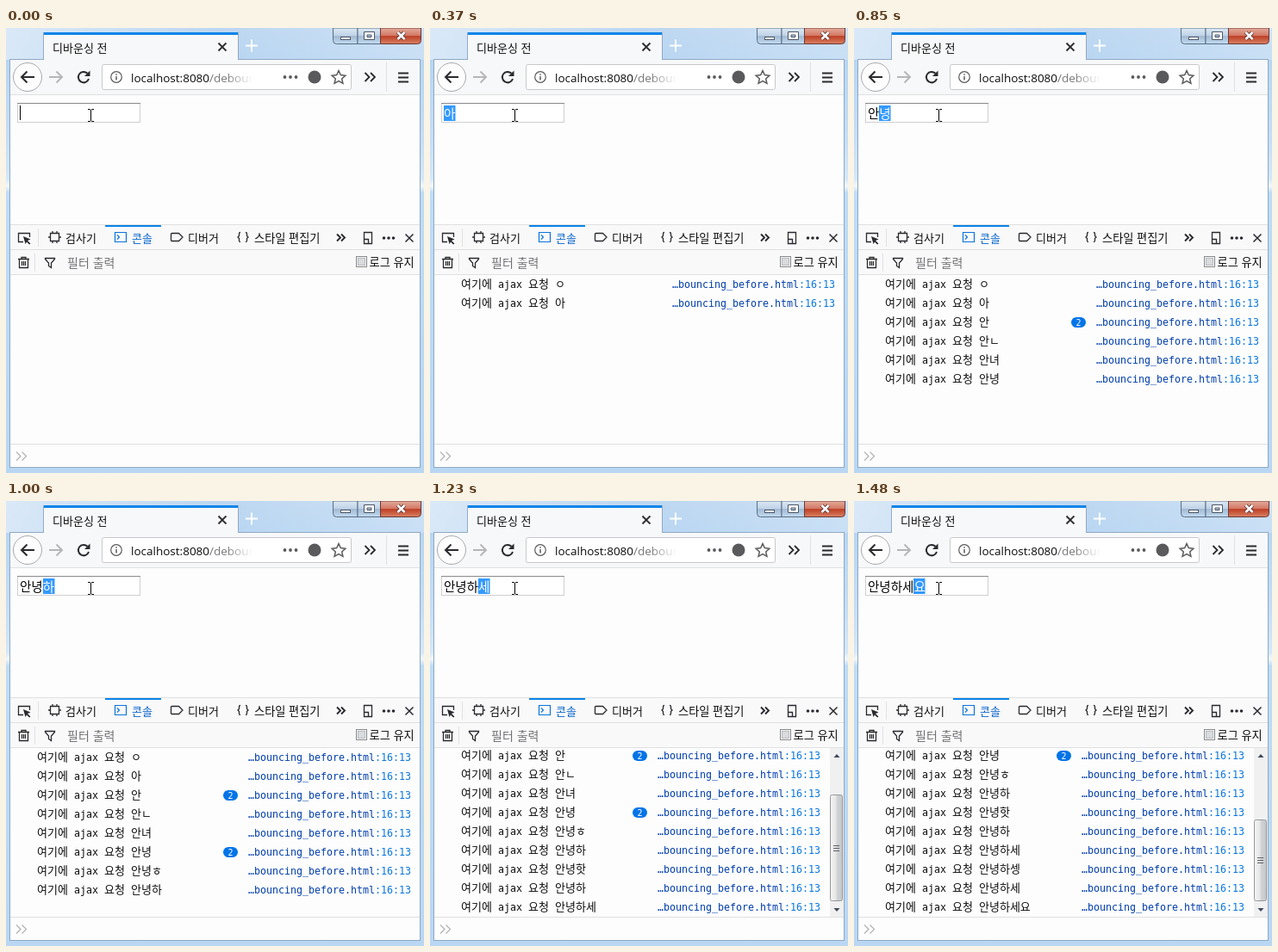
Write an HTML page that moves like this. It is 485 px wide and 517 px high and loops after 1.93 s.

```html
<!DOCTYPE html>
<html lang="ko">
<head>
<meta charset="utf-8">
<title>디바운싱 전</title>
<style>
html, body { margin: 0; width: 100%; height: 100%; overflow: hidden; }
svg { display: block; width: 485px; height: 517px; }
text { font: 13px "Noto Sans CJK KR", "Noto Sans CJK JP", "Noto Sans CJK", sans-serif; fill: #0c0c0d; white-space: pre; }
.url { font: 13.5px "Open Sans", "Noto Sans", sans-serif; }
.mono { font: 11.63px "DejaVu Sans Mono", monospace; }
.field { font-size: 14.5px; fill: #000; }
.line { fill: none; stroke: #2a2a2e; stroke-width: 1.3; }
.rule { fill: none; stroke: #e0e0e2; }
</style>
</head>
<body>
<svg viewBox="0 0 485 517" xmlns="http://www.w3.org/2000/svg">
  <defs>
    <linearGradient id="glass" x1="0" y1="0" x2="0" y2="1">
      <stop offset="0" stop-color="#bdd7f1"/><stop offset=".07" stop-color="#b7d5f2"/>
      <stop offset=".25" stop-color="#c6def5"/><stop offset=".34" stop-color="#d6e8f8"/>
      <stop offset=".355" stop-color="#f2f8fd"/><stop offset=".37" stop-color="#bfdcf5"/>
      <stop offset="1" stop-color="#b9d7f3"/>
    </linearGradient>
    <linearGradient id="shine" x1="0" x2="1">
      <stop offset="0" stop-color="#fff" stop-opacity=".45"/>
      <stop offset=".5" stop-color="#fff" stop-opacity="0"/>
      <stop offset="1" stop-color="#fff" stop-opacity=".25"/>
    </linearGradient>
    <linearGradient id="button" x1="0" y1="0" x2="0" y2="1">
      <stop offset="0" stop-color="#dce9f6"/><stop offset=".48" stop-color="#bfd2e6"/>
      <stop offset=".52" stop-color="#a2bad3"/><stop offset="1" stop-color="#c3dbf0"/>
    </linearGradient>
    <linearGradient id="red" x1="0" y1="0" x2="0" y2="1">
      <stop offset="0" stop-color="#e5ab9c"/><stop offset=".48" stop-color="#d27863"/>
      <stop offset=".52" stop-color="#bd3f25"/><stop offset="1" stop-color="#d98264"/>
    </linearGradient>
    <linearGradient id="fade">
      <stop offset="0" stop-color="#fff" stop-opacity="0"/><stop offset="1" stop-color="#fff"/>
    </linearGradient>
    <linearGradient id="thumbFill">
      <stop offset="0" stop-color="#f4f4f4"/><stop offset=".48" stop-color="#e6e6e7"/>
      <stop offset=".52" stop-color="#d3d4d6"/><stop offset="1" stop-color="#c4c6c9"/>
    </linearGradient>
    <clipPath id="view"><rect x="5" y="287" width="475" height="196"/></clipPath>
    <clipPath id="address"><rect x="112" y="43" width="174" height="28"/></clipPath>
  </defs>

  <!-- window frame -->
  <rect width="485" height="517" fill="url(#glass)"/>
  <rect width="485" height="37" fill="url(#shine)"/>
  <rect x="4.5" y="36.5" width="476" height="474" fill="#fdfdfd" stroke="#8fa9c3"/>
  <g stroke="#5b6f85">
    <path d="M379.5 0H408V18.500H383.500Q379.500 18.500 379.500 14.500Z" fill="url(#button)"/>
    <path d="M408 0H434.500V18.500H408Z" fill="url(#button)"/>
    <path d="M434.500 0H481.500V14.500Q481.500 18.500 477.500 18.500H434.500Z" fill="url(#red)" stroke="#6a3a3a"/>
  </g>
  <g fill="#fff" stroke="#4b5666">
    <rect x="388.500" y="10.500" width="11" height="3"/>
    <path d="M415.500 4.500H427.500V13.500H415.500ZM419 8V10.500H424V8Z" fill-rule="evenodd"/>
  </g>
  <path d="M454.500 5l8 8m0-8l-8 8" stroke="#5c3a3a" stroke-width="4.500"/>
  <path d="M454.500 5l8 8m0-8l-8 8" stroke="#fff" stroke-width="2.500"/>

  <!-- tab -->
  <rect x="44" y="5" width="225" height="33" fill="#f7f8f9"/>
  <path d="M43.500 36V5M269.500 36V5" stroke="#93abc3"/>
  <rect x="44" y="5" width="225" height="3" fill="#0a84e8"/>
  <text x="54" y="28">디바운싱 전</text>
  <path d="M246.500 17.500l9 9m0-9l-9 9" class="line" style="stroke-width:1.800"/>
  <path d="M278 20.500H292M285 13.500V27.500" stroke="#fff" stroke-width="2"/>

  <!-- navigation bar -->
  <rect x="5" y="37" width="475" height="40" fill="#f7f8f9"/>
  <path d="M5 77.500H480M441.500 40V74" class="rule"/>
  <circle cx="25" cy="57" r="16.500" fill="#fdfdfd" stroke="#a9a9ac"/>
  <path d="M33 57H18M24.500 50.500L18 57L24.500 63.500" class="line" style="stroke-width:2"/>
  <path d="M50 57H65M58.500 50.500L65 57L58.500 63.500" class="line" style="stroke:#b6b6b8;stroke-width:2"/>
  <path d="M96 59A6.200 6.200 0 1 1 94.500 52.800" class="line" style="stroke-width:2"/>
  <path d="M97.500 49.500V56H91Z" fill="#2a2a2e"/>
  <rect x="111.500" y="42.500" width="289" height="29" rx="2" fill="#fff" stroke="#c8c8ca"/>
  <circle cx="128" cy="57" r="6.300" class="line" style="stroke:#5a5a5d;stroke-width:1.200"/>
  <path d="M128 56V60.500M128 53.200V54.700" stroke="#5a5a5d" stroke-width="1.500"/>
  <g clip-path="url(#address)">
    <text class="url" x="145" y="62.500">localhost:8080<tspan fill="#77777a">/debouncing_before.html</tspan></text>
    <rect x="256" y="44" width="30" height="26" fill="url(#fade)"/>
  </g>
  <g fill="#5a5a5d">
    <circle cx="323.500" cy="57" r="1.900"/><circle cx="330" cy="57" r="1.900"/><circle cx="336.500" cy="57" r="1.900"/>
    <circle cx="358" cy="57" r="7.500"/>
  </g>
  <path d="M386 49.500L388.300 54.600L393.800 55.200L389.700 58.900L390.900 64.300L386 61.500L381.100 64.300L382.300 58.900L378.200 55.200L383.700 54.600Z" class="line" style="stroke:#5a5a5d;stroke-width:1.500"/>
  <path d="M416.500 52l5 5l-5 5M423 52l5 5l-5 5" class="line" style="stroke-width:1.800"/>
  <path d="M455 52.500H467M455 57.500H467M455 62.500H467" class="line" style="stroke-width:1.800"/>

  <!-- page -->
  <rect x="13.500" y="87.500" width="142" height="22" fill="#fff" stroke="#cfcfd2"/>
  <path d="M13 87.500H156" stroke="#8b8b8f"/>
  <rect id="mark" y="90" height="18" fill="#3399ff"/>
  <text class="field" x="16" y="104.500"><tspan id="done"></tspan><tspan id="live" fill="#fff"></tspan></text>
  <rect id="caret" x="16" y="90" width="1" height="17"/>
  <path d="M95 94.500H97.500L98.500 95.500L99.500 94.500H102M98.500 95V108M95 108.500H97.500L98.500 107.500L99.500 108.500H102" fill="none" stroke="#000"/>

  <!-- tool tabs -->
  <rect x="5" y="228" width="475" height="59" fill="#f9f9fa"/>
  <path d="M5 228.500H480M5 257.500H480M5 286.500H480M37.500 233V254M33.500 262V283" class="rule"/>
  <rect x="115" y="229" width="65" height="2" fill="#0a84e8"/>
  <path d="M20 248.500H14.500V238.500H27.500V243" class="line"/>
  <path d="M20 242L28.500 245.500L25 247L28.500 250.500L27 251.500L24 248.500L22.500 251Z" fill="#2a2a2e"/>
  <path d="M51.500 238.500H61.500V247.500H51.500ZM54 236V238M59 236V238M54 248V250M59 248V250M49 243H51M62 243H64" class="line"/>
  <text x="69" y="248.500">검사기</text>
  <g style="--c:#0a6fd6">
    <path d="M126.500 237.500H139.500V248.500H126.500ZM129 240.500l2.500 2.500l-2.500 2.500" class="line" style="stroke:#0a74dd;stroke-width:1.200"/>
    <text x="146" y="248.500" style="fill:#0a66cc">콘솔</text>
  </g>
  <path d="M192.500 238.500H200.500L205 243L200.500 247.500H192.500Q191.500 247.500 191.500 246.500V239.500Q191.500 238.500 192.500 238.500Z" class="line"/>
  <text x="211" y="248.500">디버거</text>
  <path d="M272 237.500Q270.500 237.500 270.500 239V241.500L269 243L270.500 244.500V247Q270.500 248.500 272 248.500M278 237.500Q279.500 237.500 279.500 239V241.500L281 243L279.500 244.500V247Q279.500 248.500 278 248.500" class="line"/>
  <text x="288" y="248.500" style="font-size:13.200px">스타일 편집기</text>
  <path d="M384 239.500l4 4l-4 4M389 239.500l4 4l-4 4" class="line" style="stroke-width:1.900"/>
  <path d="M415.500 237.500H424.500V250.500H415.500ZM415.500 245.500H420.500V250.500" class="line"/>
  <g fill="#2a2a2e"><circle cx="438.500" cy="244" r="1.800"/><circle cx="444" cy="244" r="1.800"/><circle cx="449.500" cy="244" r="1.800"/></g>
  <path d="M463.500 239.500l9 9m0-9l-9 9" class="line" style="stroke-width:1.500"/>

  <!-- filter row -->
  <path d="M14 268.500H27M18 268V266.500H23V268M15.500 269V278.500H25.500V269M18.500 271V276M20.500 271V276M22.500 271V276" class="line"/>
  <path d="M45.500 267.500H56.500V268.500L52.500 273V278.500L49.500 276.500V273L45.500 268.500Z" class="line"/>
  <text x="71" y="277.500" style="font-size:14px;fill:#737377">필터 출력</text>
  <rect x="406.500" y="265.500" width="12" height="12" fill="#f2f2f2" stroke="#8c8c8c"/>
  <rect x="408.500" y="267.500" width="8" height="8" fill="#d9dbdd" stroke="#b9bdc2"/>
  <text x="421.500" y="277" style="font-size:13.200px">로그 유지</text>

  <!-- console -->
  <g id="rows" clip-path="url(#view)"></g>
  <g id="bar">
    <rect x="464" y="287" width="16" height="196" fill="#f0f0f1"/>
    <path d="M468.500 298L472 294L475.500 298ZM468.500 473L472 477L475.500 473Z" fill="#3f4a5c"/>
    <rect id="thumb" x="464.500" width="14" rx="2" fill="url(#thumbFill)" stroke="#97999c"/>
    <path id="grip" d="M468 -2.500H475M468 .5H475M468 3.500H475" stroke="#5c6066"/>
  </g>
  <path d="M5 483.500H480" class="rule"/>
  <path d="M12 492.500l5 5l-5 5M18.500 492.500l5 5l-5 5" class="line" style="stroke:#b4b4b8"/>
</svg>
<script>
const LOOP = 1930, ROW = 22, TOP = 287, BOTTOM = 483, CELL = 13.34;
const logs = ["ㅇ", "아", "안", "안ㄴ", "안녀", "안녕", "안녕ㅎ", "안녕하", "안녕핫",
  "안녕하", "안녕하세", "안녕하셍", "안녕하세", "안녕하세요"];
const repeated = [2, 5];
// start time, field value, number of log rows
const steps = [
  [0, "", 0], [70, "", 0], [220, "ㅇ", 1], [300, "아", 1], [370, "아", 2], [450, "안", 3],
  [600, "안ㄴ", 4], [700, "안녀", 5], [770, "안녕", 5], [850, "안녕", 6],
  [1000, "안녕하", 8], [1150, "안녕핫", 8], [1230, "안녕하세", 11],
  [1330, "안녕하셍", 12], [1400, "안녕하세요", 12], [1480, "안녕하세요", 14]
];
const $ = id => document.getElementById(id);
const show = (el, on) => el.setAttribute("visibility", on ? "visible" : "hidden");

function rowMarkup(i, count, top, right) {
  const y = top + i * ROW + 15;
  const badge = repeated.includes(i) && count > i + 1
    ? `<rect x="${right - 218}" y="${y - 10}" width="17" height="12" rx="6" fill="#0074e8"/>
       <text class="mono" style="font-size:10px;fill:#fff" text-anchor="middle" x="${right - 209.5}" y="${y - .3}">2</text>`
    : "";
  return `<text x="36" y="${y}">여기에</text><text class="mono" x="79" y="${y}">ajax</text>
    <text x="114" y="${y}">요청</text><text x="145" y="${y}">${logs[i]}</text>${badge}
    <text class="mono" text-anchor="end" x="${right}" y="${y}" style="fill:#003eaa">…bouncing_before.html<tspan fill="#0a78e0">:16:13</tspan></text>`;
}

function draw(step) {
  const [time, value, count] = step;
  const head = value.slice(0, -1);
  $("done").textContent = head;
  $("live").textContent = value.slice(-1);
  $("mark").setAttribute("x", Math.round(16 + head.length * CELL));
  $("mark").setAttribute("width", value ? 13.5 : 0);
  show($("caret"), time === 0);

  const height = count * ROW, over = height > BOTTOM - TOP;
  const top = over ? BOTTOM - height : TOP;
  $("rows").innerHTML = logs.slice(0, count)
    .map((_, i) => rowMarkup(i, count, top, over ? 453 : 470)).join("");

  show($("bar"), over);
  if (over) {
    const size = Math.round(152 * (BOTTOM - TOP) / height - (count - 11));
    $("thumb").setAttribute("y", 464.5 - size);
    $("thumb").setAttribute("height", size);
    $("grip").setAttribute("transform", `translate(0 ${Math.round(464 - size / 2)})`);
  }
}

const start = performance.now();
let current;
function tick(now) {
  const t = Math.max(0, now - start) % LOOP;
  const step = steps.findLast(s => s[0] <= t);
  if (step !== current) draw(current = step);
  requestAnimationFrame(tick);
}
tick(start);
</script>
</body>
</html>
```
